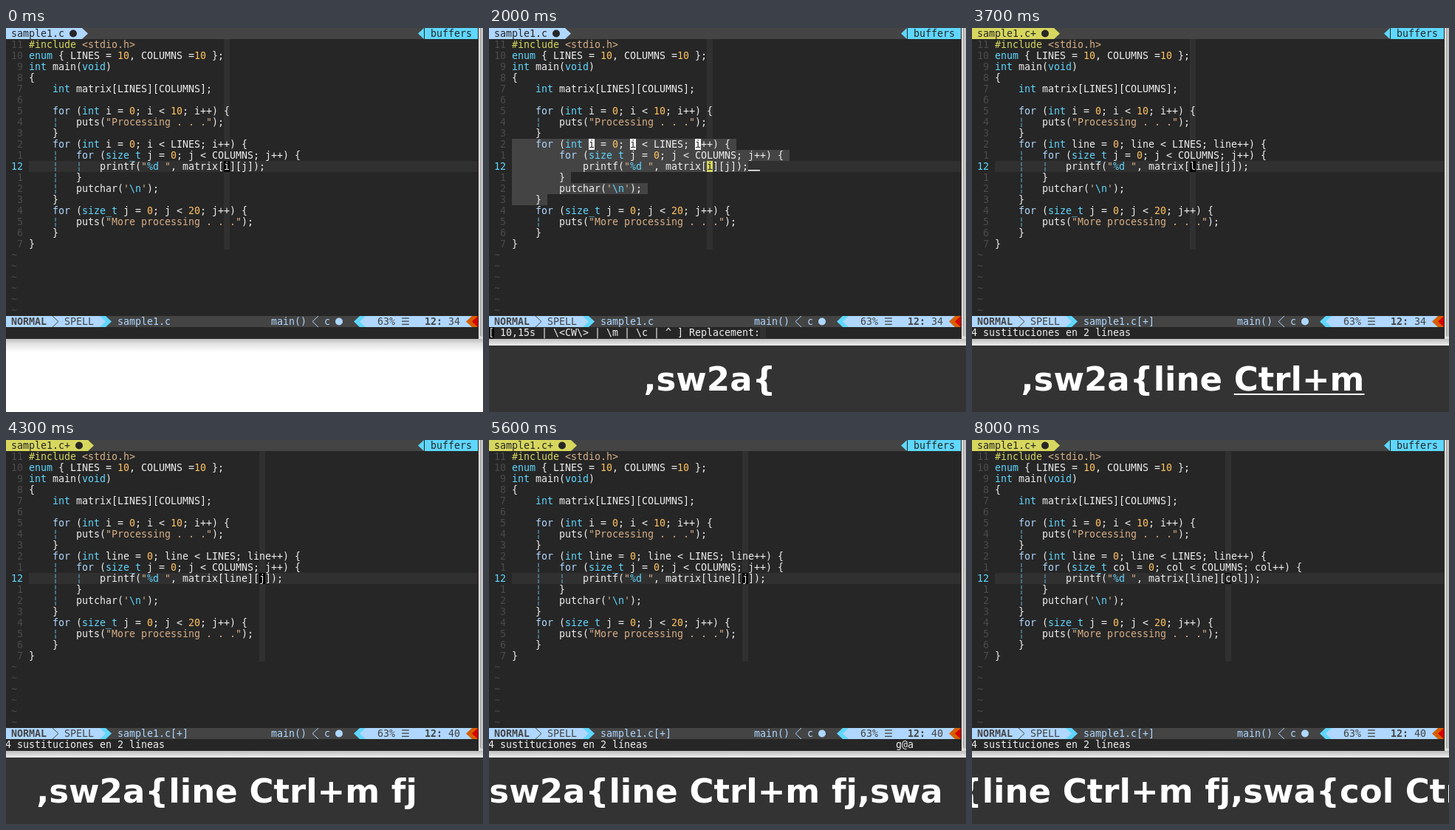
An HTML page with a canvas that plays this animation: 646 by 520 pixels, repeating every 8100 ms.

```html
<!DOCTYPE html>
<html lang="en">
<head>
<meta charset="utf-8">
<title>Editor rename demo</title>
<style>
html, body { margin: 0; width: 646px; height: 520px; overflow: hidden; background: #fff; }
canvas { display: block; }
</style>
</head>
<body>
<canvas id="stage" width="646" height="520"></canvas>
<script>
const ctx = document.getElementById('stage').getContext('2d');
const LOOP = 8100, CELL = 8, ROW = 15, CODE_X = 31;
const MONO = '13.29px "DejaVu Sans Mono", monospace';
const BIG = 'bold 45px "DejaVu Sans", sans-serif';
const C = {
  bg: '#262626', line: '#303030', bar: '#444444', visual: '#444444', dim: '#4a4a4a',
  text: '#eeeeee', pale: '#afd7ff', blue: '#5fd7ff', green: '#d7d75f',
  string: '#d7af87', number: '#ffc25f', guide: '#5fa8c8', orange: '#d75f00', red: '#d70000'
};

// Editor and key overlay state; each step changes some fields.
// keys: text shown, mark: how many of its last letters are underlined.
const FIRST = ',sw2a{', SECOND = FIRST + 'line Ctrl+m', THIRD = SECOND + ' fj';
const start = { outer: 'i', inner: 'j', col: 33, cmd: '', msg: '', keys: '', mark: 0,
                ask: null, range: null, saved: true, hollow: false };
const steps = [
  [400, { cmd: ',', keys: ',', mark: 1 }],
  [600, { mark: 0 }],
  [800, { cmd: ',s', keys: ',s', mark: 1 }],
  [900, { cmd: ',sw', keys: ',sw' }],
  [1000, { mark: 0 }],
  [1500, { cmd: ',sw2', keys: ',sw2', mark: 1 }],
  [1600, { cmd: '2g@a', keys: ',sw2a' }],
  [1700, { mark: 0 }],
  [1800, { cmd: '', keys: FIRST, mark: 1, ask: '', range: [10, 15], word: 'i' }],
  [2000, { mark: 0 }],
  [3000, { ask: 'li', keys: FIRST + 'li', mark: 2 }],
  [3200, { ask: 'lin', keys: FIRST + 'lin', mark: 1 }],
  [3300, { ask: 'line', keys: FIRST + 'line' }],
  [3400, { mark: 0 }],
  [3600, { ask: null, range: null, outer: 'line', saved: false, msg: '4 sustituciones en 2 líneas' }],
  [3700, { keys: SECOND, mark: 6 }],
  [3900, { mark: 0 }],
  [4000, { cmd: 'f', keys: SECOND + ' f', mark: 1 }],
  [4100, { mark: 0 }],
  [4300, { cmd: '', keys: THIRD, col: 39 }],
  [4800, { cmd: ',', keys: THIRD + ',', mark: 1 }],
  [4900, { cmd: ',s', keys: THIRD + ',s' }],
  [5000, { mark: 0 }],
  [5200, { cmd: ',sw' }],
  [5300, { keys: THIRD + ',sw', mark: 1 }],
  [5400, { cmd: 'g@a' }],
  [5500, { keys: THIRD + ',swa' }],
  [5600, { mark: 0 }],
  [5900, { cmd: '', keys: THIRD + ',swa{', mark: 1, ask: '', range: [11, 13], word: 'j' }],
  [6200, { mark: 0 }],
  [6600, { ask: 'c', keys: THIRD + ',swa{c', mark: 1 }],
  [6700, { ask: 'co', keys: THIRD + ',swa{co' }],
  [7000, { ask: 'col', keys: THIRD + ',swa{col', mark: 0 }],
  [7400, { ask: null, range: null, inner: 'col', keys: THIRD + ',swa{col Ctrl+m', mark: 6 }],
  [7600, { mark: 0 }],
  [8000, { hollow: true }]
];

const source = (a, b) => [
  '#include <stdio.h>',
  'enum { LINES = 10, COLUMNS =10 };',
  'int main(void)',
  '{',
  '    int matrix[LINES][COLUMNS];',
  '',
  '    for (int i = 0; i < 10; i++) {',
  '        puts("Processing . . .");',
  '    }',
  `    for (int ${a} = 0; ${a} < LINES; ${a}++) {`,
  `        for (size_t ${b} = 0; ${b} < COLUMNS; ${b}++) {`,
  `            printf("%d ", matrix[${a}][${b}]);`,
  '        }',
  "        putchar('\\n');",
  '    }',
  '    for (size_t j = 0; j < 20; j++) {',
  '        puts("More processing . . .");',
  '    }',
  '}'
];

const syntax = [
  [/#include/g, C.green],
  [/\b(enum|int|void|size_t)\b/g, C.blue],
  [/\bfor\b/g, C.pale],
  [/\b\d+\b/g, C.number],
  [/"[^"]*"|'[^']*'|<stdio\.h>/g, C.string],
  [/%d|\\n/g, C.blue]
];

function rect(x, y, w, h, color) {
  ctx.fillStyle = color;
  ctx.fillRect(x, y, w, h);
}

function write(text, x, row, color, bold) {
  ctx.font = (bold ? 'bold ' : '') + MONO;
  [...text].forEach((ch, i) => {
    ctx.fillStyle = Array.isArray(color) ? color[i] : color;
    if (ch !== ' ') ctx.fillText(ch, x + i * CELL, row * ROW + 12);
  });
}

// Powerline arrow; dir 1 points right, -1 points left.
function arrow(x, row, dir, color, thin) {
  const y = row * ROW, back = dir > 0 ? x : x + 8, tip = dir > 0 ? x + 8 : x;
  ctx.beginPath();
  ctx.moveTo(back, y);
  ctx.lineTo(tip, y + ROW / 2);
  ctx.lineTo(back, y + ROW);
  ctx.fillStyle = ctx.strokeStyle = color;
  ctx.lineWidth = 1;
  thin ? ctx.stroke() : ctx.fill();
}

function dot(x, y, color) {
  ctx.beginPath();
  ctx.arc(x, y, 5, 0, Math.PI * 2);
  ctx.fillStyle = color;
  ctx.fill();
}

function paint(text) {
  const colors = Array(text.length).fill(C.text);
  for (const [pattern, color] of syntax)
    for (const m of text.matchAll(pattern)) colors.fill(color, m.index, m.index + m[0].length);
  return colors;
}

function drawCode(s) {
  rect(CODE_X, 12 * ROW, 608, ROW, C.line);
  rect(CODE_X + s.col * CELL, ROW, CELL, 19 * ROW, C.line);
  source(s.outer, s.inner).forEach((text, i) => {
    const row = i + 1, y = row * ROW, here = row === 12;
    const selected = s.range && row >= s.range[0] && row <= s.range[1];
    const label = String(here ? 12 : Math.abs(12 - row));
    write(label.padStart(2), 7, row, here ? C.blue : C.dim);

    const colors = paint(text);
    const end = CODE_X + text.length * CELL;
    if (selected) {
      rect(CODE_X, y, end - CODE_X + (here ? 0 : CELL), ROW, C.visual);
      if (here) rect(end, y + 12, 16, 1.5, '#fff');
      for (const m of text.matchAll(new RegExp(`\\b${s.word}\\b`, 'g'))) {
        rect(CODE_X + m.index * CELL, y, CELL, ROW, here ? C.green : '#fff');
        colors[m.index] = C.bg;
      }
    } else {
      const indent = text.search(/\S/);
      for (let k = 4; k < indent; k += 4) write('¦', CODE_X + k * CELL, row, C.guide);
    }
    if (here && !selected) {
      const x = CODE_X + s.col * CELL;
      if (s.hollow) {
        ctx.strokeStyle = '#000';
        ctx.lineWidth = 1;
        ctx.strokeRect(x + .5, y + .5, CELL - 1, ROW - 1);
      } else {
        rect(x, y, CELL, ROW, '#000');
      }
    }
    write(text, CODE_X, row, colors);
  });
  for (let row = 20; row < 26; row++) write('~', 7, row, C.dim);
}

function drawTabs(s) {
  const color = s.saved ? C.pale : C.green, w = s.saved ? 103 : 111;
  rect(0, 0, 639, ROW, C.bar);
  rect(0, 0, w, ROW, color);
  arrow(w, 0, 1, color);
  write('sample1.c' + (s.saved ? '' : '+'), 7, 0, C.bg);
  dot(w - 12, 7.5, C.bg);
  arrow(558, 0, -1, C.blue);
  rect(566, 0, 1, ROW, C.bg);
  rect(567, 0, 72, ROW, C.blue);
  write('buffers', 575, 0, C.bg);
}

function drawStatus(s) {
  const row = 26, y = row * ROW;
  rect(0, y, 639, ROW, C.bar);
  rect(0, y, 127, ROW, C.pale);
  write('NORMAL', 7, row, C.bar, true);
  arrow(63, row, 1, C.bar, true);
  write('SPELL', 79, row, C.bar);
  rect(127, y, 8, ROW, C.blue);
  arrow(127, row, 1, C.pale);
  arrow(135, row, 1, C.blue);
  write('sample1.c' + (s.saved ? '' : '[+]'), 151, row, C.pale);
  write('main()', 359, row, C.pale);
  arrow(415, row, -1, C.pale, true);
  write('c', 431, row, C.pale);
  dot(451, y + 7.5, C.pale);
  arrow(471, row, -1, C.blue);
  rect(479, y, 8, ROW, C.blue);
  arrow(479, row, -1, C.pale);
  rect(487, y, 144, ROW, C.pale);
  write('63% ☰', 503, row, C.bar);
  write('12:', 567, row, C.bar, true);
  write(String(s.col + 1), 599, row, C.bar);
  arrow(623, row, -1, C.orange);
  rect(631, y, 8, ROW, C.orange);
  arrow(631, row, -1, C.red);
}

function drawCommand(s) {
  const row = 27;
  if (s.ask === null) {
    write(s.msg, -1, row, C.text);
    write(s.cmd, 551, row, C.text);
    return;
  }
  const prompt = `[ ${s.range[0]},${s.range[1]}s | \\<CW\\> | \\m | \\c | ^ ] Replacement:${s.ask}`;
  rect(0, row * ROW, 7, ROW, '#000');
  rect(-1 + prompt.length * CELL, row * ROW, CELL, ROW, C.line);
  write(prompt, -1, row, C.text);
}

function drawKeys(s) {
  if (!s.keys) return;
  rect(0, 430, 646, 90, '#333');
  ctx.font = BIG;
  const width = t => ctx.measureText(t).width;
  const x = 299 - width(s.keys) / 2;
  ctx.fillStyle = '#fff';
  ctx.fillText(s.keys, x, 491);
  if (s.mark) {
    const tail = width(s.keys.slice(-s.mark));
    ctx.fillRect(x + width(s.keys) - tail, 495, tail, 2);
  }
}

function drawWindow() {
  rect(0, 0, 646, 520, '#fff');
  const shade = ctx.createLinearGradient(0, 420, 0, 439);
  shade.addColorStop(0, '#b8b8b8');
  shade.addColorStop(.4, '#e2e2e2');
  shade.addColorStop(1, '#fff');
  rect(0, 420, 646, 19, shade);
  rect(0, 0, 640, 421, C.bg);
  rect(640, 0, 6, 421, '#e0dedc');
  rect(642, 0, 1, 417, '#a0a0a0');
  rect(643, 0, 3, 418, '#c4c4c4');
}

function draw(s) {
  drawWindow();
  drawCode(s);
  drawTabs(s);
  drawStatus(s);
  drawCommand(s);
  drawKeys(s);
}

let shown = -1;
function tick() {
  const t = performance.now() % LOOP;
  const count = steps.filter(([at]) => at <= t).length;
  if (count !== shown) {
    shown = count;
    draw(Object.assign({}, start, ...steps.slice(0, count).map(step => step[1])));
  }
  requestAnimationFrame(tick);
}
tick();
</script>
</body>
</html>
```
